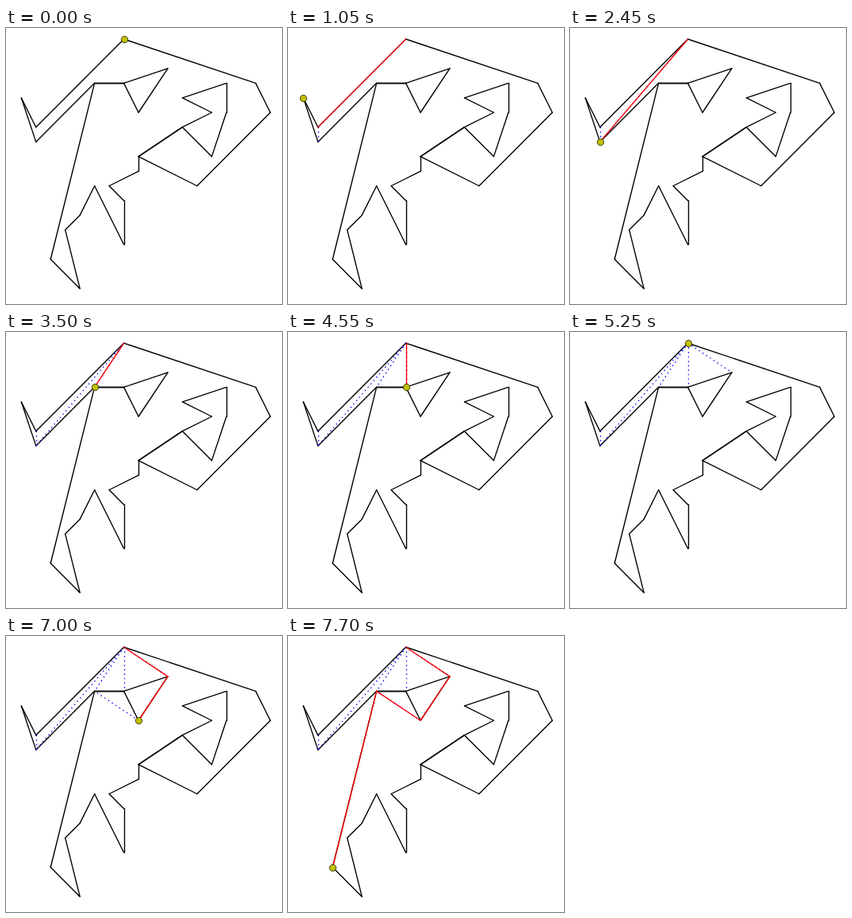
Write an HTML page that moves like this. It is 348x347 px and loops after 8000 ms.

```html
<!DOCTYPE html>
<html lang="en">
<head>
<meta charset="utf-8">
<title>Ear clipping</title>
<style>
html, body { margin: 0; width: 100%; height: 100%; overflow: hidden; background: #fff; }
svg { display: block; width: 348px; height: 347px; }
line { stroke-width: 1.39; stroke-linecap: round; }
#outline { stroke: #000; }
#chords { stroke: #00f; }
#chords line { stroke-linecap: butt; stroke-dasharray: 1.39 4.17; }
#path { stroke: #f00; }
#ball { fill: #bfbf00; stroke: #000; stroke-width: .7; }
</style>
</head>
<body>
<svg viewBox="0 0 348 347">
  <g id="outline"></g>
  <g id="chords"></g>
  <g id="path"></g>
  <circle id="ball" r="4.17"/>
</svg>
<script>
const STEP = 350, LOOP = 8000, STATES = 23;

// Polygon corners on an integer grid, counterclockwise on screen
const corners = [
  [7,0], [1,6], [0,4], [1,7], [5,3], [7,3], [10,2], [8,5], [7,3], [5,3],
  [2,15], [4,17], [3,13], [4,12], [5,10], [7,14], [7,11], [6,10], [8,9], [8,8],
  [11,6], [13,8], [14,5], [14,3], [11,4], [13,5], [11,6], [8,8], [12,10], [17,5], [16,3]
];

const toScreen = ([i, j]) => [19.3 + 18.47 * i, 14 + 18.45 * j];
const snap = v => Math.round(v) + .5;
const cross = (a, b, c) =>
  (b[0] - a[0]) * (c[1] - b[1]) - (b[1] - a[1]) * (c[0] - b[0]);
const same = (a, b) => a[0] === b[0] && a[1] === b[1];

function isEar(a, b, c) {
  if (cross(a, b, c) >= 0) return false;
  return !corners.some(p =>
    ![a, b, c].some(q => same(p, q)) &&
    cross(a, b, p) <= 0 && cross(b, c, p) <= 0 && cross(c, a, p) <= 0);
}

// Walk the corners, cutting ears and stepping back after each cut
function buildStates() {
  const states = [], path = [corners[0]], chords = [];
  const record = ball => states.push({ ball, path: [...path], chords: [...chords] });
  record(corners[0]);
  for (let next = 1; states.length < STATES; next++) {
    path.push(corners[next]);
    record(corners[next]);
    const ahead = corners[next + 1];
    while (path.length > 1 && isEar(path.at(-2), path.at(-1), ahead)) {
      const cut = path.pop();
      chords.push([path.at(-1), ahead]);
      record(cut);
      record(path.at(-1));
    }
  }
  return states;
}

function segment([a, b]) {
  let [x1, y1] = toScreen(a), [x2, y2] = toScreen(b);
  if (x1 === x2) x1 = x2 = snap(x1);
  if (y1 === y2) y1 = y2 = snap(y1);
  return `<line x1="${x1}" y1="${y1}" x2="${x2}" y2="${y2}"/>`;
}

const byId = id => document.getElementById(id);
const draw = (id, segments) => { byId(id).innerHTML = segments.map(segment).join(""); };
const links = points => points.slice(1).map((p, k) => [points[k], p]);

const states = buildStates();
let shown = -1;

function render(time) {
  const index = Math.min(Math.floor((time % LOOP) / STEP), STATES - 1);
  if (index === shown) return;
  shown = index;
  const { ball, path, chords } = states[index];
  draw("chords", chords);
  draw("path", links(path));
  const [x, y] = toScreen(ball);
  byId("ball").setAttribute("cx", snap(x));
  byId("ball").setAttribute("cy", snap(y));
}

draw("outline", links([...corners, corners[0]]));
render(0);
const start = performance.now();
function tick() {
  render(performance.now() - start);
  requestAnimationFrame(tick);
}
requestAnimationFrame(tick);
</script>
</body>
</html>
```
